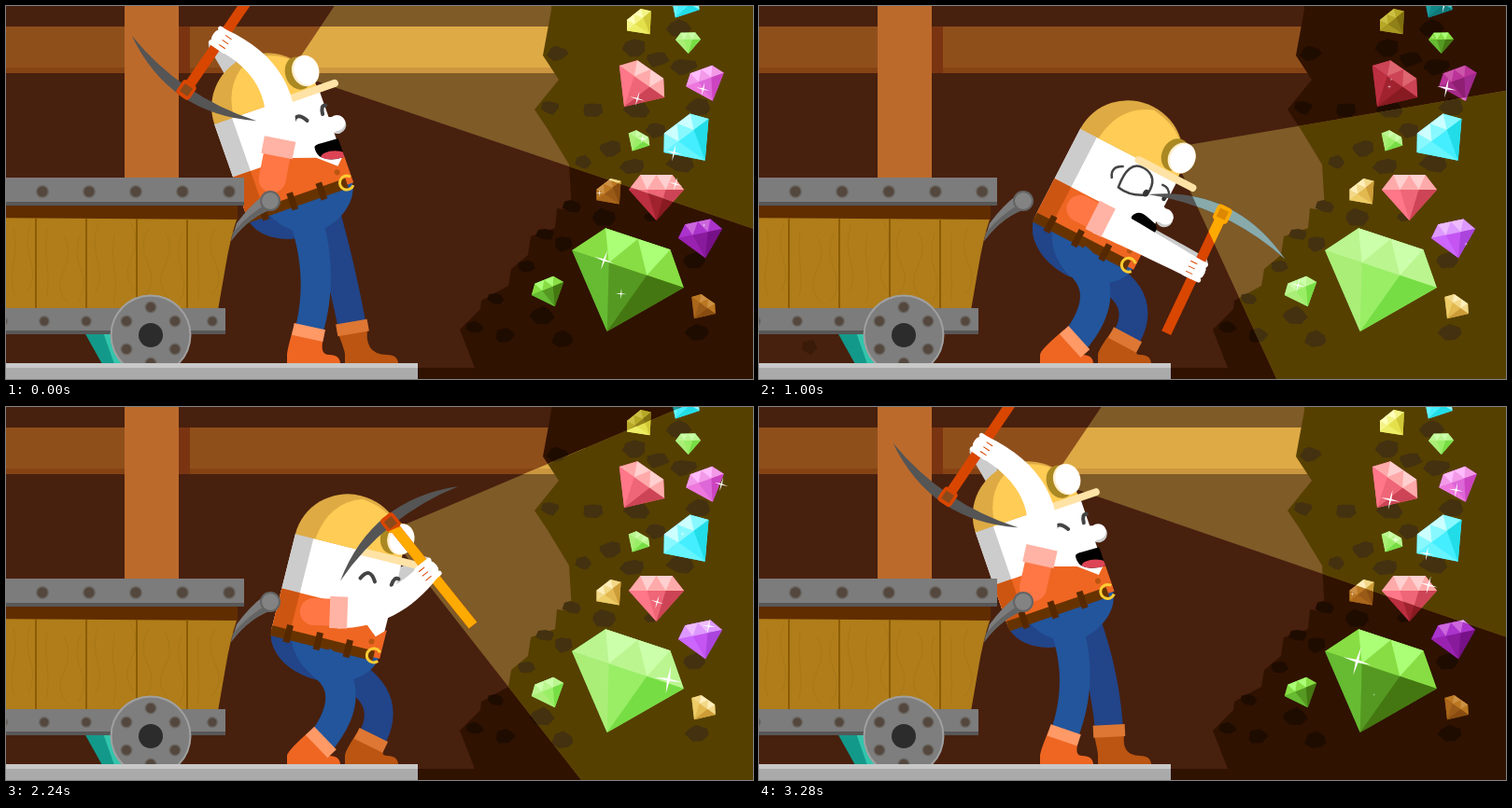
Write an HTML page with a canvas that moves like this. It is 800x400 px and loops after 3320 ms.

```html
<!DOCTYPE html>
<html lang="en">
<head>
<meta charset="utf-8">
<title>Gem miner</title>
<style>
html, body { margin: 0; width: 100%; height: 100%; overflow: hidden; background: #48200e; }
canvas { display: block; width: 800px; height: 400px; }
</style>
</head>
<body>
<canvas id="stage" width="800" height="400"></canvas>
<script>
const ctx = document.getElementById('stage').getContext('2d');
const LOOP = 3320, STEP = 40, HIT = 200, RAD = Math.PI / 180, TAU = Math.PI * 2;

// ---- helpers ----
function poly(pts, color) {
  ctx.beginPath();
  pts.forEach(p => ctx.lineTo(p[0], p[1]));
  ctx.closePath();
  ctx.fillStyle = color;
  ctx.fill();
}
function rect(x, y, w, h, color) {
  ctx.fillStyle = color;
  ctx.fillRect(x, y, w, h);
}
function oval(x, y, rx, ry, color, rot = 0) {
  ctx.beginPath();
  ctx.ellipse(x, y, rx, ry, rot, 0, TAU);
  ctx.fillStyle = color;
  ctx.fill();
}
function line(d, color, width, cap = 'round') {
  ctx.strokeStyle = color;
  ctx.lineWidth = width;
  ctx.lineCap = cap;
  ctx.stroke(new Path2D(d));
}
function shape(d, color) {
  ctx.fillStyle = color;
  ctx.fill(new Path2D(d));
}
function place(x, y, angle, draw) {
  ctx.save();
  ctx.translate(x, y);
  ctx.rotate(angle * RAD);
  draw();
  ctx.restore();
}
// Tapered limb along a quadratic curve
function limb(a, b, c, w0, w1, color) {
  const left = [], right = [];
  for (let i = 0; i <= 16; i++) {
    const t = i / 16, s = 1 - t;
    const x = s * s * a[0] + 2 * s * t * b[0] + t * t * c[0];
    const y = s * s * a[1] + 2 * s * t * b[1] + t * t * c[1];
    const dx = s * (b[0] - a[0]) + t * (c[0] - b[0]);
    const dy = s * (b[1] - a[1]) + t * (c[1] - b[1]);
    const k = mix(w0, w1, t) / 2 / (Math.hypot(dx, dy) || 1);
    left.push([x - dy * k, y + dx * k]);
    right.unshift([x + dy * k, y - dx * k]);
  }
  poly(left.concat(right), color);
}
const mix = (a, b, t) => a + (b - a) * t;
const mixAll = (a, b, t) => a.map((v, i) => mix(v, b[i], t));
const polar = (r, angle) => [Math.cos(angle * RAD) * r, Math.sin(angle * RAD) * r];

function seeded(seed) {
  const rnd = () => (seed = (seed * 16807) % 2147483647) / 2147483647;
  for (let i = 0; i < 3; i++) rnd();
  return rnd;
}

// ---- gems and wall ----
// Shades: crown, bright crown, left, middle and right facet; plain, then lit
const SHADES = {
  green: ['#88dd44 #aaff77 #66bb33 #559922 #447711', '#bbf590 #ccffaa #aaee77 #99ee66 #77dd44'],
  red: ['#cc4455 #dd6670 #bb2f40 #a0222f #881a22', '#ffaaaa #ffd0d0 #ff7788 #ee6677 #cc4455'],
  pink: ['#bb3399 #cc55aa #a52a88 #8e1f72 #a02a90', '#f299e8 #ffbbff #ee77dd #dd66d8 #cc44c0'],
  violet: ['#aa33cc #cc66dd #9922b0 #881a9c #771188', '#dd99ff #eebbff #cc66ff #c455f2 #aa44dd'],
  cyan: ['#22aaaa #44c4c4 #1a9c9c #118888 #0f7a7a', '#88f8ff #ccffff #66f4ff #44eeff #22dde8'],
  lemon: ['#b8a828 #ccc044 #a89820 #908018 #807010', '#f4f488 #ffffbb #eeee66 #e4e04c #d0c838'],
  amber: ['#bb7722 #cc9044 #aa661a #995a18 #884c10', '#f2d888 #ffeebb #eecc66 #e2b850 #cc9c38']
};
for (const k in SHADES) SHADES[k] = SHADES[k].map(s => s.split(' '));

// Hue, girdle centre, girdle width, tilt
const GEMS = [
  ['green', 666, 282, 126, 18.4], ['red', 696.5, 197, 59, 0], ['red', 681, 81, 59, 35],
  ['pink', 748.5, 79, 43, -20], ['cyan', 728.5, 139, 60, -37], ['lemon', 678, 16, 33, -39],
  ['green', 730.5, 36, 27, -1], ['cyan', 727, -5, 36, 30], ['green', 678, 143, 26, 30],
  ['amber', 645.5, 198, 33, -38], ['violet', 743.5, 244, 48, -12], ['green', 580, 303, 37, -22],
  ['amber', 747, 321, 31, 35]
];
function gem([hue, x, y, w, tilt], lit) {
  const c = SHADES[hue][lit];
  const T = [-.29, 0, .29].map(v => [v * w, -.27 * w]);
  const G = [-.5, -.17, .17, .5].map(v => [v * w, 0]);
  const B = [0, .56 * w];
  place(x, y, tilt, () => {
    poly([G[0], T[0], T[2], G[3], B], c[3]);
    poly([G[0], T[0], T[2], G[3]], c[0]);
    poly([T[0], T[1], G[1]], c[1]);
    poly([T[1], T[2], G[2]], c[1]);
    poly([G[0], G[1], B], c[2]);
    poly([G[2], G[3], B], c[4]);
  });
}

const EDGE = '585,-20 584,4 575,53 592,79 566,111 580,132 603,170 606,219 590,217 588,238 562,247 559,267 541,282 538,300 509,316 508,325 486,347 502,388'
  .split(' ').map(s => s.split(',').map(Number));
const WALL = [...EDGE, [441, 388], [441, 440], [820, 440], [820, -20]];

// Dark clods: beside the wall's edge, under the gems, and a few loose ones
function clod([x, y], n) {
  const rnd = seeded(n * 811 + 77), r = 9 + rnd() * 7;
  return Array.from({ length: 7 }, (_, i) => {
    const a = i / 7 * TAU + rnd() * .4, k = r * (.75 + rnd() * .35);
    return [x + Math.cos(a) * k, y + Math.sin(a) * k * .72];
  });
}
const CLODS = [
  ...EDGE.filter((_, i) => i > 1 && i % 2 === 0).map(([x, y]) => [x + 16, y - 2]),
  ...GEMS.map(([, x, y]) => [x - 6, y + 29]),
  [697, 57], [647, 153], [697, 133], [596, 357], [597, 255], [628, 111], [535, 353]
].map(clod);

function cave(lit) {
  const c = lit ? ['#7f5b28', '#deaa45', '#cb963f', '#564000', '#433110']
                : ['#48200e', '#8f4f1b', '#854314', '#301200', '#1f0c00'];
  rect(-20, -20, 840, 440, c[0]);
  rect(-20, 22, 640, 50, c[1]);
  rect(-20, 66, 640, 6, c[2]);
  poly(WALL, c[3]);
  CLODS.forEach(s => poly(s, c[4]));
  GEMS.forEach(g => gem(g, lit));
}

// ---- sparkles: each gem flashes a few times per loop at a random spot ----
function star(x, y, r, turn) {
  place(x, y, turn, () => poly(Array.from({ length: 8 }, (_, i) => polar(i % 2 ? r * .13 : r, i * 45)), '#fff'));
}
function sparkle(t) {
  GEMS.forEach(([, x, y, w, tilt], n) => {
    const rnd = seeded(n * 977 + 31), count = 6;
    for (let i = 0; i < count; i++) {
      const peak = (i + rnd()) * LOOP / count;
      const px = (rnd() - .5) * w * .8, py = (rnd() - .35) * w * .5;
      const r = (5 + w * .12) * (.7 + rnd() * .4);
      const d = (t - peak + LOOP * 1.5) % LOOP - LOOP / 2;
      const k = 1 - Math.abs(d) / 180;
      if (k > 0) place(x, y, tilt, () => star(px, py, r * k, 12 - tilt + d * .08));
    }
  });
}

// ---- cart ----
function rivet(x, y, r) {
  oval(x, y, r + 1, r + 1, '#6a6661');
  oval(x, y, r - .5, r - .5, '#54473d');
}
function grain() {
  const rnd = seeded(5);
  for (let x = 8; x < 225; x += 18) {
    const y = 232 + rnd() * 20, bow = 24 * (rnd() - .5);
    line(`M${x} ${y}q${bow} 18 0 38t${bow / 3} 34`, '#a87717', 1);
  }
}
function cart() {
  poly([[84, 350], [118, 350], [130, 384], [103, 384]], '#13998a');
  poly([[104, 350], [122, 350], [134, 384], [116, 384]], '#33c4ac');
  rect(-20, 212, 268, 18, '#602d00');
  shape('M-20 227L247 229Q240 250 235 280L227 326H-20Z', '#b07d1a');
  grain();
  for (let x = 32; x < 200; x += 54) line(`M${x} 228V324`, '#8c5c04', 2, 'butt');
  rect(-20, 184, 275, 30, '#7c7c7c');
  rect(-20, 210, 275, 4, '#585858');
  for (let x = 39; x < 250; x += 50) rivet(x, 199, 6);
  rect(-20, 324, 255, 28, '#7c7c7c');
  rect(-20, 348, 255, 4, '#585858');
  for (let x = -4; x < 230; x += 45) rivet(x, 338, 5);
  oval(155, 353, 43.5, 43.5, '#a0a0a0');
  oval(155, 353, 41.5, 41.5, '#7e7e7e');
  oval(155, 353, 13, 13, '#2c2c2c');
  for (let a = 30; a < 390; a += 60) {
    const [x, y] = polar(30, a);
    rivet(155 + x, 353 + y, 5.5);
  }
}
function lever() {
  shape('M247 233Q262 213 276 203L290 216Q262 224 241 252Z', '#7c7c7c');
  shape('M290 216Q262 224 241 252L243 243Q260 222 284 210Z', '#646464');
  oval(283, 209, 11, 11, '#646464');
  oval(283, 209, 9, 9, '#838383');
}
function rails() {
  rect(-20, 384, 461, 40, '#aaaaaa');
  rect(-20, 383, 461, 5, '#c8c8c8');
}

// ---- motion ----
// Body x, y, lean; grip distance and direction; pick angle, arm angle, knee bend
const WIND = [311.4, 206.2, -19.3, 189, -115.4, -55.6, -79, 0];
const STRUCK = [347, 248.3, 27.3, 125.5, 15, 115.3, 27, 1];
const LIFT = [340, 251, 14, 136, -33.7, 51.3, 2, .95];
const RAISED = [322.4, 217, -18.9, 191, -114.9, -56, -77, .25];
const MOVES = [
  { end: HIT, from: WIND, to: STRUCK, ease: u => u ** 3 },
  { end: 1680, from: STRUCK, to: STRUCK, ease: u => u },
  { end: 2240, from: STRUCK, to: LIFT, ease: u => u ** 3 },
  { end: 2720, from: LIFT, to: RAISED, ease: u => 1 - (1 - u) ** 1.8 },
  { end: LOOP, from: RAISED, to: WIND, ease: u => u ** 20 }
];
function pose(t) {
  const i = MOVES.findIndex(m => t < m.end), m = MOVES[i];
  const begin = i ? MOVES[i - 1].end : 0;
  const v = mixAll(m.from, m.to, m.ease((t - begin) / (m.end - begin)));
  const [x, bodyY, lean, reach, swing, pick, arm, bend] = v;
  const held = t > HIT && t < 1680;
  const y = bodyY + (held ? 2 * Math.sin((t - HIT) / (1680 - HIT) * Math.PI) : 0);
  const cos = Math.cos(lean * RAD), sin = Math.sin(lean * RAD);
  const at = (px, py) => [x + px * cos - py * sin, y + px * sin + py * cos];
  const [gx, gy] = polar(reach, swing);
  return { x, y, lean, grip: [x + gx, y + gy], pick, arm, bend, at, hit: t >= 160 && t < 1800 };
}

function inBeam(p, draw) {
  const [x, y] = p.at(38, -130);
  ctx.save();
  ctx.beginPath();
  ctx.moveTo(x, y);
  for (const a of [-37, 38]) {
    const [dx, dy] = polar(1400, p.lean + a);
    ctx.lineTo(x + dx, y + dy);
  }
  ctx.clip();
  draw();
  ctx.restore();
}

// ---- miner ----
function boot([x, y], tilt, heel, color, cuff) {
  const [c, s] = polar(17, tilt), toe = heel + 57;
  shape(`M${x - c} ${y - s}L${x + c} ${y + s}Q${x + c - 6} 374 ${toe - 12} 374Q${toe} 374 ${toe} 384` +
    `H${heel}V374Q${heel} 369 ${x - c} ${y - s}Z`, color);
  line(`M${x - c} ${y - s}L${x + c} ${y + s}`, cuff, 13, 'butt');
}
function backLeg(p) {
  const b = p.bend, ankle = mixAll([371, 345], [392, 358], b);
  limb(p.at(23, 24), mixAll([360, 287], [421, 310], b), ankle, 33, 30, '#224488');
  boot(ankle, mix(-10, 28, b), 363, '#bb5511', '#dd7733');
}
function frontLeg(p) {
  const b = p.bend, ankle = mixAll([324, 350], [338, 360], b);
  limb(p.at(2, 22), mixAll([341, 290], [382, 305], b), ankle, 35, 30, '#22559c');
  boot(ankle, mix(12, 48, b), 301, '#ee6622', '#ff9966');
}
function face(p) {
  if (p.hit) {
    line('M8-67Q4-98 22-98Q42-97 39-74Q24-64 8-67M-3-73Q-10-83 2-89M49-91Q57-92 60-84', '#444', 2.5);
    oval(37, -75, 3, 4, '#333');
    oval(57, -80, 2.5, 4, '#333');
    shape('M35-46Q38-56 50-53L62-50Q68-44 63-39L46-40Q35-40 35-46Z', '#000');
  } else {
    line('M22-75Q29-90 38-75M56-76Q57-86 62-84', '#444', 4);
    const open = Math.min(1, 1.4 * (1 - p.bend));
    ctx.save();
    ctx.translate(0, -45);
    ctx.scale(1, open);
    const mouth = new Path2D('M36 0Q36-3 45-2L63-1V20Q46 20 38 11Q35 6 36 0Z');
    ctx.fillStyle = '#000';
    ctx.fill(mouth);
    ctx.clip(mouth);
    oval(53, 17, 15, 7, '#dd4455', .33);
    ctx.restore();
  }
  oval(67, -60, 9.5, 9.5, '#ccc');
  oval(67, -62, 9, 8.5, '#fff');
  oval(60, -62, 8, 9, '#fff');
}
function body(p) {
  place(p.x, p.y, p.lean, () => {
    shape('M-57 0A59.5 42 0 0 0 62 0Z', '#22559c');
    shape('M-57 0A59.5 42 0 0 0 6 42Q-28 30-36 0Z', '#224488');
    rect(-57, -105, 118, 105, '#fff');
    rect(-57, -105, 20, 105, '#ccc');
    shape('M-57-44H5L34-34L53-18L63-28V4H-57Z', '#ee6622');
    rect(-57, -44, 20, 46, '#cc5511');
    oval(50, -12, 3, 3, '#bb5511');
    shape('M-57-104A58.5 57 0 0 1 60-104Z', '#ddaa44');
    shape('M-35-104Q-31-146 4-158Q56-152 60-104Z', '#ffcc55');
    rect(-57, -3, 113, 11, '#663300');
    for (let x = -42; x < 40; x += 33) rect(x, -8, 7, 19, '#552800');
    ctx.beginPath();
    ctx.arc(56, 2, 7.5, .7, 5.6);
    ctx.strokeStyle = '#ffcc33';
    ctx.lineWidth = 3;
    ctx.stroke();
    face(p);
    oval(46, -126, 14, 18, '#aa8822');
    line('M14-103H79', '#ffe3a6', 8);
    oval(54, -126, 14.5, 17, '#ffeecc');
    oval(55, -126, 13, 16, '#fff');
  });
}
function pickaxe(p, lit) {
  const c = lit ? ['#88aaaa', '#ffaa00', '#dd8800'] : ['#555555', '#d94600', '#8a4a1a'];
  const [dx, dy] = polar(66, p.pick);
  place(p.grip[0] - dx, p.grip[1] - dy, p.pick, () => {
    rect(0, -5.5, 141, 11, c[1]);
    shape('M15-81Q-32 0 15 81Q-9 0 15-81Z', c[0]);
    ctx.beginPath();
    ctx.roundRect(-9, -8.5, 18, 17, 4);
    ctx.fillStyle = c[1];
    ctx.fill();
    rect(-5, -5, 10, 10, c[2]);
  });
}
function farArm(p) {
  const [dx, dy] = polar(8, p.pick), s = p.at(2, -38);
  const hand = [p.grip[0] - dx, p.grip[1] - dy];
  limb(s, mixAll(s, hand, .5), hand, 18, 17, '#ccc');
  oval(hand[0], hand[1], 9, 9, '#ccc');
}
function nearArm(p) {
  const up = (27 - p.arm) / 105, s = p.at(-18, -28), d = polar(1, p.arm);
  const on = k => [s[0] + d[0] * k, s[1] + d[1] * k];
  const bar = (a, b, color, w) => line(`M${on(a)}L${on(b)}`, color, w, 'butt');
  const len = mix(24, 34, up);
  limb(on(len), on(len + mix(52, 80, up)), p.grip, 34, 23, '#fff');
  place(p.grip[0], p.grip[1], p.pick, () => {
    oval(0, 0, 11, 10, '#fff');
    for (let x = -9; x < 10; x += 6) line(`M${x}-7V10`, '#fff', 5);
    for (let x = -6; x < 7; x += 6) line(`M${x} 2V9`, '#d94600', 1);
  });
  bar(0, len, '#ff7744', 29);
  oval(s[0], s[1], 14.5, 14.5, '#ff7744');
  bar(len - 9, len + 10, '#ffb3a4', 34);
}

// ---- chips thrown back by the blow ----
function chip(u, fling, lift, fall, r, color) {
  const x = 562 - fling * (1 - Math.exp(-.0038 * u)) - .04 * u;
  const y = Math.min(374, 270 - lift * u + fall * u * u);
  place(x, y, u * -.35, () => poly([0, 80, 140, 220, 290].map(a => polar(r, a)), color));
}
function chips(t) {
  const u = t - HIT;
  if (u < 0 || t > 1700) return;
  chip(u, 575, 1.123, .001535, 10, '#8b4f22');
  chip(u, 500, .222, .000427, 8.5, '#3a1a08');
}

function draw(t) {
  const p = pose(t), s = t - 280;
  const shake = s < -40 || s > 500 ? 0 : Math.round(8 * Math.exp(-s / 90) * Math.cos(s / 160 * TAU));
  ctx.setTransform(1, 0, 0, 1, 0, shake);
  cave(0);
  inBeam(p, () => cave(1));
  rect(127, -20, 58, 220, '#bc6a2c');
  rect(185, 22, 12, 50, '#7a3411');
  farArm(p);
  backLeg(p);
  body(p);
  frontLeg(p);
  pickaxe(p, 0);
  inBeam(p, () => pickaxe(p, 1));
  nearArm(p);
  chips(t);
  lever();
  cart();
  rails();
  sparkle(t);
}

const start = performance.now();
function tick() {
  const t = (performance.now() - start) % LOOP;
  draw(Math.floor(t / STEP) * STEP);
  requestAnimationFrame(tick);
}
tick();
</script>
</body>
</html>
```
